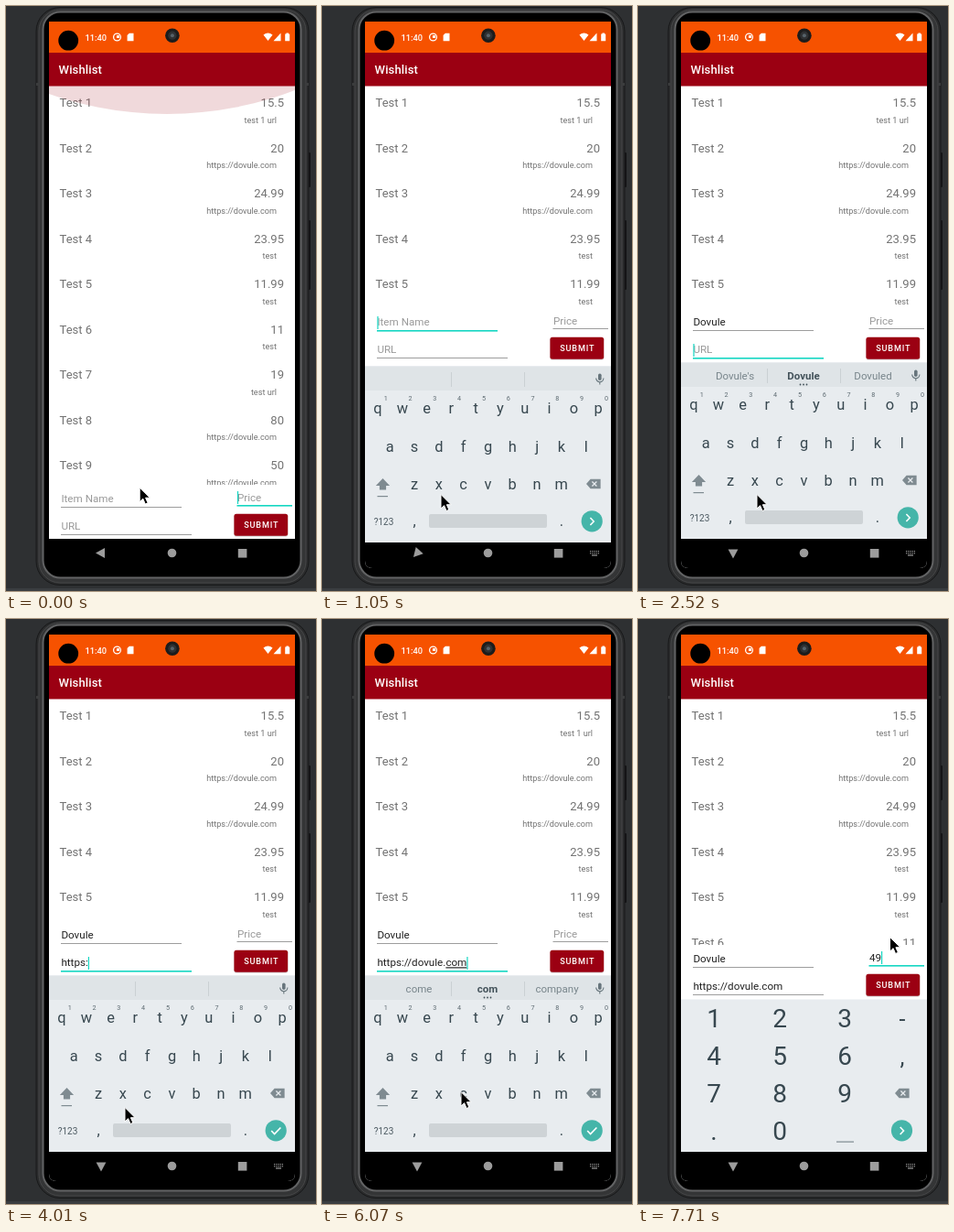
Write an HTML page that moves like this. It is 339 by 639 pixels and loops after 8000 ms.

```html
<!DOCTYPE html>
<html lang="en">
<head>
<meta charset="utf-8">
<title>Wishlist</title>
<style>
html, body { margin: 0; width: 100%; height: 100%; overflow: hidden; background: #2e3032; }
svg { display: block; width: 100vw; height: 100vh; font-family: Roboto, "Open Sans", sans-serif; }
text { white-space: pre; }
</style>
</head>
<body>
<svg id="stage" viewBox="0 0 339 639">
  <defs>
    <clipPath id="screen"><path d="M47 17H316V606Q316 614 308 614H55Q47 614 47 606Z"/></clipPath>
    <clipPath id="listClip"><rect id="listBox" x="47" y="88" width="269" height="435"/></clipPath>
  </defs>
  <g id="phone"></g>
  <g clip-path="url(#screen)">
    <rect x="47" y="17" width="269" height="566" fill="#fff"/>
    <g id="list" clip-path="url(#listClip)"></g>
    <g id="glow"></g>
    <g id="form"></g>
    <g id="bars"></g>
    <g id="keys"></g>
    <g id="nav"></g>
  </g>
  <g id="lens"></g>
  <path id="mouse" d="M0 0V15.5L3.6 12.2L6.1 18L8.9 16.8L6.4 11.2H11.2Z" fill="#000" stroke="#fff" stroke-width="1"/>
</svg>
<script>
const LOOP = 8000;
const TEAL = '#14d6c2', INK = '#37474f', RED = '#9b0012';
const $ = id => document.getElementById(id);

const text = (s, x, y, size, fill, more = '') =>
  `<text x="${x}" y="${y}" font-size="${size}" fill="${fill}" ${more}>${s}</text>`;
const rect = (x, y, w, h, fill, more = '') =>
  `<rect x="${x}" y="${y}" width="${w}" height="${h}" fill="${fill}" ${more}/>`;
const path = (d, fill, more = '') => `<path d="${d}" fill="${fill}" ${more}/>`;
const circle = (x, y, r, fill, more = '') =>
  `<circle cx="${x}" cy="${y}" r="${r}" fill="${fill}" ${more}/>`;
const MID = 'text-anchor="middle"', END = 'text-anchor="end"';

// Fixed parts
$('phone').innerHTML =
  rect(0, 636, 339, 3, '#3a3d40') +
  rect(329, 160, 4, 38, '#131314', 'rx="1"') +
  rect(329, 234, 4, 76, '#131314', 'rx="1"') +
  rect(33, 1.5, 298, 631, '#2a2b2c', 'rx="26" stroke="#18191a"') +
  rect(36, 4, 292, 626, '#343536', 'rx="23" stroke="#464748"') +
  rect(40.5, 6.5, 282, 618, '#000', 'rx="19" stroke="#626364" stroke-width="2"') +
  rect(33, 84, 4, 3, '#3b3c3d') + rect(327, 84, 4, 3, '#3b3c3d');

const SITE = 'https://dovule.com';
const rows = [
  ['15.5', 'test 1 url'], ['20', SITE], ['24.99', SITE], ['23.95', 'test'], ['11.99', 'test'],
  ['11', 'test'], ['19', 'test url'], ['80', SITE], ['50', SITE]
];
$('list').innerHTML = rows.map(([price, url], i) => {
  const y = Math.floor(110.5 + i * 49.5);
  return text('Test ' + (i + 1), 58.5, y, 13.04, '#737373') +
    text(price, 304, y, 13.04, '#737373', END) +
    text(url, 296, Math.round(127.8 + i * 49.5), 9.13, '#737373', END);
}).join('');

$('bars').innerHTML =
  rect(47, 17, 269, 34, '#f65200') + rect(47, 51, 269, 36.5, RED) +
  text('Wishlist', 57.6, 74, 13.04, '#fff', 'font-weight="500" letter-spacing=".1"') +
  text('11:40', 86.5, 37.6, 9.3, '#fff', 'font-weight="500"') +
  circle(121.5, 34, 3.9, 'none', 'stroke="#fff" stroke-width="1.3"') +
  rect(121, 32, 3, 3, '#fff') +
  path('M134.8 29.8H139.5V38.2H132.6V32Z', '#fff') +
  path('M281.5 31.6Q286.5 27.6 291.5 31.6L286.5 38Z', '#fff') +
  path('M300.5 29.6V38.2H292.5Z', '#fff') +
  path('M306.4 29.6H309V30.6H310.2V38.2H305.2V30.6H306.4Z', '#fff');
$('lens').innerHTML = circle(68.2, 37.7, 10.9, '#000') + circle(181.9, 32.2, 7.8, '#1c1c1c') +
  circle(181.9, 32.2, 4.6, '#2f3133') + circle(181.9, 32.2, 2, '#56626a');

// Keyboards
const backspace = (x, y) =>
  path(`M${x - 8} ${y}l4.6-5.2h11v10.4h-11z`, '#7f8b91') +
  path(`M${x - 1.6} ${y - 2.5}l5 5m0-5l-5 5`, 'none', 'stroke="#e8ecef" stroke-width="1.2"');

const enter = (x, check) => circle(x, 558.8, 11.6, '#45b5a9') +
  path(check ? `M${x - 5} 559l3.4 3.5l6.8-7` : `M${x - 1.8} 555l3.8 4l-3.8 4`,
    'none', 'stroke="#fff" stroke-width="1.6"');

function letters(s) {
  let out = rect(47, 389.5, 269, 230, '#e8ecef') + rect(47, 389.5, 269, 26.5, '#dfe4e7');
  const [left, mid, right] = s.hints || ['', '', ''];
  out += rect(141, 396, .8, 16, '#c5cbcf') + rect(221, 396, .8, 16, '#c5cbcf') +
    text(left, 106, 408, 11.5, '#78858b', MID) +
    text(mid, 181, 408, 11.5, '#43525a', MID + ' font-weight="700"') +
    text(right, 257, 408, 11.5, '#78858b', MID);
  if (mid) out += [177.5, 181, 184.5].map(x => circle(x, 413.5, .9, '#43525a')).join('');
  out += rect(302, 397.5, 3.6, 7.6, '#67757c', 'rx="1.8"') +
    path('M299.7 402.6a4.1 4.1 0 0 0 8.2 0M303.8 406.8v2.6', 'none', 'stroke="#67757c" stroke-width="1.1"');
  [['qwertyuiop', 61, 441], ['asdfghjkl', 74.3, 482.5], ['zxcvbnm', 101, 523.5]].forEach(([line, x0, y], r) => {
    [...line].forEach((c, i) => {
      const x = x0 + i * 26.8;
      out += text(c, x, y, 16.4, INK, MID);
      if (!r) out += text((i + 1) % 10, x + 8.7, 427, 7.2, '#5d6a71', MID);
    });
  });
  return out + path('M66.5 512l7.6 8h-4v4.6h-7.2v-4.6h-4z', '#7f8b91') + rect(60.5, 531, 11.5, 1.2, '#7f8b91') +
    backspace(297, 518) + text('?123', 67.5, 562.6, 10, '#4c5a61', MID) +
    text(',', 101, 563.5, 16.4, INK, MID) + rect(117, 551, 129, 15, '#ced3d6', 'rx="2"') +
    text('.', 262, 563.5, 16.4, INK, MID) + enter(295.2, s.check);
}

function digits() {
  let out = rect(47, 415.5, 269, 200, '#e8ecef');
  ['123-', '456,', '789', '.0'].forEach((line, r) => [...line].forEach((c, i) => {
    out += text(c, [83, 155, 226, 289][i], 446 + r * 41, i == 3 ? 25 : 28, INK, MID);
  }));
  return out + rect(217, 570.5, 19, 1.2, '#7f8b91') + backspace(289, 518) + enter(288.5, false);
}

// Form
const fields = {
  item: { x: 60, w: 132, y: 542.3, line: 547, hint: 'Item Name' },
  url: { x: 60, w: 143, y: 572.3, line: 577, hint: 'URL' },
  price: { x: 252.5, w: 60.5, y: 541, line: 545, hint: 'Price' }
};

function drawForm(s) {
  let out = '';
  for (const name in fields) {
    const f = fields[name], on = s.focus == name, val = s[name];
    const shown = on && name != 'price'
      ? val.replace(/[a-z]+$/i, '<tspan text-decoration="underline">$&</tspan>') : val;
    out += text(shown || f.hint, f.x + .4, f.y, 11.65, val ? '#212121' : '#9a9a9a', `id="t-${name}"`) +
      rect(f.x, f.line, f.w, on ? 1.6 : .8, on ? TEAL : '#858585');
    if (on && s.caret) out += rect(f.x + .4, Math.round(f.y - 10.8), 1.2, 14, TEAL, 'id="caret"');
  }
  out += rect(249.4, 555.7, 58.8, 24, '#000', 'rx="2.5" opacity=".15"') +
    rect(249.4, 554.8, 58.8, 24, RED, 'rx="2.5"') +
    text('SUBMIT', 279.3, 570.2, 9.13, '#fff', MID + ' font-weight="500" letter-spacing=".85"');
  $('form').innerHTML = out;
  $('form').setAttribute('transform', `translate(0 ${s.dy})`);
  const caret = $('caret');
  if (caret && s[s.focus])
    caret.setAttribute('x', fields[s.focus].x + .4 + $('t-' + s.focus).getComputedTextLength());
}

function draw(s) {
  $('listBox').setAttribute('height', 435 + s.dy);
  $('glow').innerHTML = s.glow
    ? circle(176, 88 + 30 * s.glow - 390, 390, RED, `opacity="${.15 * s.glow}"`) : '';
  drawForm(s);
  $('keys').innerHTML = rect(47, 582, 269, 32, '#000') +
    (s.kb ? `<g transform="translate(0 ${s.slide})" opacity="${s.fade}">${s.kb == 'abc' ? letters(s) : digits()}</g>` : '');
  let nav = rect(47, 582 + (s.slide < 9 ? s.slide : 0), 269, 32, '#000', s.slide > 9 ? 'opacity="0"' : '') +
    path('M-6 0L4 -5.4V5.4Z', '#9c9c9c', `transform="translate(104 597.5) rotate(${s.turn})"`) +
    circle(181.5, 597.5, 4.8, '#9c9c9c') + rect(253.8, 593, 9.6, 9.6, '#9c9c9c');
  if (s.kb) {
    for (let i = 0; i < 10; i++)
      nav += rect(293 + i % 5 * 2.2, 595 + (i > 4 ? 2.2 : 0), 1.2, 1.2, '#9c9c9c');
    nav += rect(295, 599.4, 6, 1.2, '#9c9c9c');
  }
  $('nav').innerHTML = nav;
  $('mouse').setAttribute('transform', `translate(${s.mouse})`);
}

// Timeline: each step changes part of the state
const steps = [
  [0, { focus: 'price', item: '', url: '', price: '', caret: 1, dy: 0, glow: 1, slide: 0, fade: 1, turn: 0, mouse: [146.2, 526] }],
  [150, { glow: .8 }],
  [300, { glow: .5, mouse: [142, 528] }],
  [450, { glow: .2, mouse: [133, 532] }],
  [600, { glow: 0, focus: 'item', mouse: [130, 533.5] }],
  [750, { dy: -193 }],
  [900, { kb: 'abc', slide: 164, fade: .16 }],
  [1050, { slide: 4, fade: 1, turn: -48 }],
  [1200, { slide: 0, turn: -90 }],
  [2520, { focus: 'url', caret: 1 }],
  [2670, { hints: null, check: 1 }],
  [2820, { caret: 0 }],
  [4010, { caret: 1 }],
  [5930, { mouse: [137, 528] }],
  [6070, { mouse: [152, 516.5] }],
  [6220, { mouse: [196, 466] }],
  [6360, { mouse: [250, 385] }],
  [6510, { mouse: [275.5, 347.5] }],
  [6660, { focus: 'price', hints: null, check: 0 }],
  [6810, { kb: '123', dy: -167 }],
  [7260, { price: '4' }],
  [7710, { price: '49' }]
];
const guesses = {
  D: ['Do', 'D', 'Did'], Do: ['Dog', 'Do', 'Does'], Dov: ['Dove', 'Dov', 'Doves'],
  Dovu: ['Dove', 'Dovu', 'Doves'], Dovul: ['Dovule', 'Dovul', 'Doves'],
  Dovule: ["Dovule's", 'Dovule', 'Dovuled'],
  h: ['hi', 'h', 'he'], ht: ['hot', 'ht', 'hit'],
  d: ['do', 'd', 'did'], do: ['dog', 'do', 'does'], dov: ['dove', 'dov', 'doves'],
  dovu: ['dove', 'dovu', 'doves'], dovul: ['dove', 'dovul', 'doves'],
  dovule: ['dovules', 'dovule', 'dovuled'],
  c: ['can', 'c', 'come'], co: ['come', 'co', 'could'], com: ['come', 'com', 'company']
};
function type(field, word, times) {
  times.forEach((t, i) => {
    const val = word.slice(0, i + 1);
    steps.push([t, { [field]: val, hints: guesses[val.match(/[a-z]*$/i)[0]] || null, caret: val != 'https:' }]);
  });
}
type('item', 'Dovule', [1340, 1640, 1790, 1940, 2080, 2230]);
type('url', SITE, [2970, 3110, 3260, 3410, 3560, 3710, 4160, 4310, 4450, 4600,
  4750, 4890, 5040, 5190, 5340, 5490, 5630, 5780]);
steps.sort((a, b) => a[0] - b[0]);

let last = -1;
const start = performance.now();
function tick() {
  const t = Math.max(0, performance.now() - start) % LOOP;
  const past = steps.filter(step => step[0] <= t);
  if (past.length != last) {
    last = past.length;
    draw(Object.assign({}, ...past.map(step => step[1])));
  }
  requestAnimationFrame(tick);
}
tick();
</script>
</body>
</html>
```
